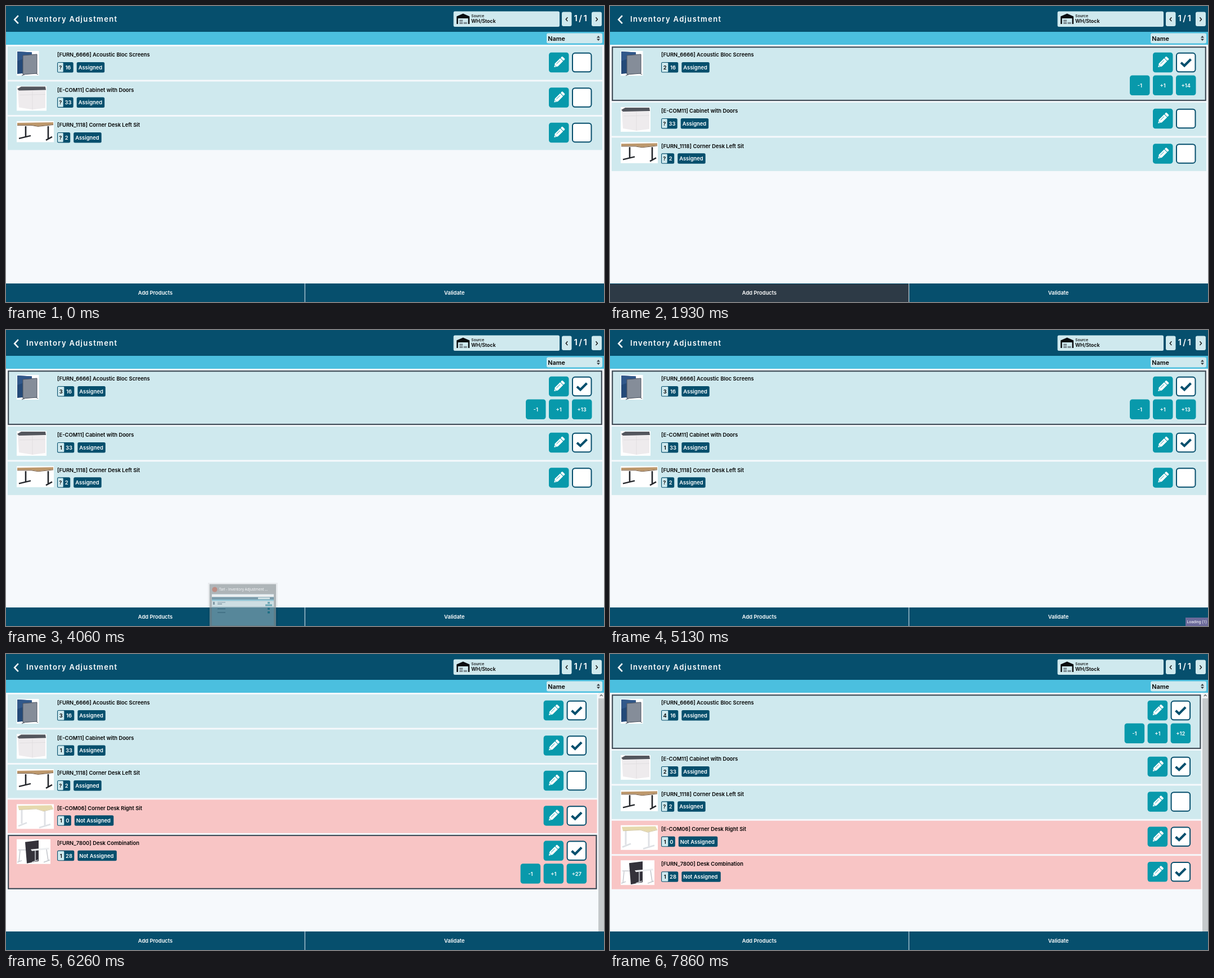
An HTML page for the animation above (8000 ms loop, 1063 px wide and 527 px high).

```html
<!DOCTYPE html>
<html lang="en">
<head>
<meta charset="utf-8">
<title>Inventory Adjustment</title>
<style>
html, body { margin: 0; width: 100%; height: 100%; overflow: hidden; background: #f6f9fc; }
svg { display: block; width: 1063px; height: 527px; font: 600 9.4px Inter, "Open Sans", sans-serif; }
.mid { text-anchor: middle; }
.light { fill: #fff; }
</style>
</head>
<body>
<svg id="stage" viewBox="0 0 1063 527" xmlns="http://www.w3.org/2000/svg">
  <rect width="1063" height="527" fill="#f6f9fc"/>
  <g id="rows"></g>
  <g id="scrollbar">
    <rect x="1053" y="69" width="10" height="425" fill="#f0f1f2"/>
    <rect x="1053" y="79" width="10" height="415" fill="#c5c9cb"/>
    <path d="M1055.8 75l2.4-2.4 2.4 2.4" fill="none" stroke="#505050" stroke-width="1.1"/>
  </g>

  <rect width="1063" height="46" fill="#064f6d"/>
  <rect y="46" width="1063" height="23" fill="#4bbfdf"/>
  <path d="M21.8 17.2l-6.6 7 6.6 7" fill="none" stroke="#fff" stroke-width="2.6"/>
  <text class="light" x="36" y="27.5" font-size="13" letter-spacing="1.35">Inventory Adjustment</text>
  <g fill="#cfe9ee">
    <rect x="795.5" y="9.5" width="188.5" height="27.5" rx="2.5"/>
    <rect x="988" y="10.5" width="17.5" height="25.5" rx="3"/>
    <rect x="1041" y="10.5" width="18" height="25.5" rx="3"/>
    <rect x="961" y="48.5" width="99" height="18" rx="3"/>
  </g>
  <path d="M801 32V18.5L812.5 13.5 824 18.5V32H821.5V22H803.5V32z" fill="#0b0d10"/>
  <path d="M806 24.5h6v3.2h-6zM806 28.8h6V32h-6zM813.5 28.8h6V32h-6z" fill="#7d8b92"/>
  <text x="827" y="20.3" font-size="6.8" font-weight="500">Source</text>
  <text x="827" y="30.2" font-size="8.9">WH/Stock</text>
  <path d="M998.3 20.3l-3 3.4 3 3.4M1048.5 20.3l3 3.4-3 3.4" fill="none" stroke="#111" stroke-width="1.4"/>
  <text class="light" x="1009.5" y="27" font-size="15" letter-spacing="2.5">1/1</text>
  <text x="963.3" y="61.5" font-size="10.8">Name</text>
  <path d="M1050 56.5l3-3.6 3 3.6zM1050 58.5l3 3.6 3-3.6z" fill="#343a40"/>

  <rect y="494" width="1063" height="33" fill="#064f6d"/>
  <rect id="hover" y="495" width="531" height="32" fill="#2d3a46"/>
  <rect x="530.8" y="494" width="1" height="33" fill="#e8f1f5"/>
  <text class="light mid" x="265.5" y="513.8">Add Products</text>
  <text class="light mid" x="797" y="513.8">Validate</text>

  <g id="preview">
    <rect x="359" y="450" width="124" height="77" fill="#000" opacity=".08"/>
    <rect x="361.8" y="452.5" width="118.2" height="74.5" fill="#8b9498"/>
    <circle cx="371" cy="462" r="4.6" fill="#a2594a"/>
    <text class="light" x="379" y="464" font-family="'Open Sans', sans-serif" font-size="6.3" font-weight="400">Tarl - Inventory Adjustment ...</text>
    <rect x="366" y="470" width="110" height="56" fill="#7fa3b0"/>
    <rect x="366" y="470.5" width="110" height="5" fill="#e6ebed"/>
    <rect x="366" y="475.5" width="110" height="4.5" fill="#3f7084"/>
    <rect x="448" y="476.3" width="21" height="2.8" fill="#c6dde2"/>
    <rect x="366" y="480" width="110" height="2" fill="#62b2c8"/>
    <rect x="366" y="482.5" width="110" height="10" fill="#b9d2d8"/>
    <path d="M368 484h3v5h-3zM376 484.5h14v1h-14zM376 487h8v1.6h-8zM376 496h14v1h-14zM376 502.500h14v1h-14z" fill="#48697a"/>
    <path d="M461 488.500h12v3h-12zM465 484h4v3.5h-4zM465 494.500h4v3.500h-4zM465 501h4v3.500h-4z" fill="#287f91"/>
  </g>
  <g id="loading">
    <rect x="1023" y="512" width="40" height="15" fill="#6b6a9a"/>
    <text class="light" x="1025.5" y="522" font-family="Roboto, sans-serif" font-size="7" font-weight="400">Loading (1)</text>
  </g>
</svg>
<script>
const LOOP = 8000;
const NAVY = '#064f6d', TEAL = '#0899ab', PALE = '#cfe9ee', PINK = '#f8c5c5';
const $ = id => document.getElementById(id);

const box = (x, y, w, h, fill, extra = '') =>
  `<rect x="${x}" y="${y}" width="${w}" height="${h}" fill="${fill}" ${extra}/>`;
const shape = (d, fill) => `<path d="${d}" fill="${fill}"/>`;
const stroke = (d, color, width) =>
  `<path d="${d}" fill="none" stroke="${color}" stroke-width="${width}"/>`;
const label = (x, y, text, attrs = '') => `<text x="${x}" y="${y}" ${attrs}>${text}</text>`;

// Thumbnails, drawn from their own top left corner.
const screens = box(0, 0, 39.5, 44, '#fff')
  + shape('M1 1L27 2.5V38L1 41z', '#244a78') + shape('M1 1L27 2.5V9L1 18z', '#31588a')
  + shape('M11 8L36 6V40L11 42z', '#858d99') + stroke('M11 8L36 6V40L11 42zM14 42l-5 2M34 40l4 2', '#4a5360', 1);
const cabinet = box(0, 0, 53, 44, '#fff')
  + shape('M2 7L51 8V39L28 42 4 38z', '#eeebed') + shape('M1 5L8 1H51L52 7 4 8z', '#53565d')
  + stroke('M5 16L51 15M28 9V42', '#dedbdd', .8);
const deskLeft = box(0, 0, 66, 37.5, '#fff')
  + stroke('M16 9V28M56 9V31', '#24272c', 2.6) + stroke('M4 31L25 26M52 34L63 28', '#24272c', 2.4)
  + shape('M1 3L65 2 65 6 38 9 26 7 1 7z', '#bd986c') + stroke('M1 7.500L26 7.500 38 9.500 65 6.500', '#71563d', 1);
const deskRight = box(0, 0, 66, 44, '#fff')
  + stroke('M9 10V35M50 12V38', '#dfe1e5', 3) + stroke('M3 39L18 33M40 42L60 36', '#dde0e4', 2.6)
  + shape('M2 3L62 2 65 8 48 12 35 8 4 10z', '#e6d9ad') + stroke('M4 10L35 8.500 48 12.500 65 8.500', '#c9bc91', .8);
const combination = box(0, 0, 60, 44, '#fff')
  + stroke('M3 19H23M6 20L4 40M19 20V38M1 41L9 38', '#c9ccd1', 1.6)
  + shape('M15 5L39 2V39L18 43z', '#34323a')
  + shape('M25 18L57 15 58 18 27 21z', '#eceef0')
  + stroke('M33 20V38M53 18L56 38M27 41L38 37M48 41L59 37', '#c5c8cd', 1.6);

const products = [
  { name: '[FURN_6666] Acoustic Bloc Screens', stock: 16, art: screens },
  { name: '[E-COM11] Cabinet with Doors', stock: 33, art: cabinet },
  { name: '[FURN_1118] Corner Desk Left Sit', stock: 2, art: deskLeft },
  { name: '[E-COM06] Corner Desk Right Sit', stock: 0, art: deskRight, extra: true },
  { name: '[FURN_7800] Desk Combination', stock: 28, art: combination, extra: true }
];

// Each scan: time, product index, counted quantity.
const scans = [
  [460, 0, 1], [1460, 0, 2], [2600, 1, 1], [3660, 0, 3], [5260, 3, 1],
  [5660, 4, 1], [6930, 1, 2], [7660, 0, 4]
];
const loadingSpans = [
  [60, 260], [400, 460], [930, 1200], [1460, 1530], [2600, 2660], [3600, 3660],
  [5130, 5260], [5600, 5660], [6860, 6930], [7600, 7660]
];

const pencil = (x, y) => `<g transform="translate(${x} ${y}) rotate(45)">`
  + box(-3.7, -12.2, 7.4, 4.2, '#fff', 'rx="1.5"') + shape('M-3.7 -7H3.7V6L0 12 -3.700 6z', '#fff')
  + stroke('M-1 -4V5M-1.600 8.500H1.600', TEAL, .9) + '</g>';

function quantityBadges(y, product, count) {
  const left = count ? 12.3 : 10.7;
  const right = product.stock > 9 ? 18 : 12.500;
  const end = 91 + left + right;
  const base = y + 41;
  return box(91, y + 28, left + right, 18.5, NAVY, 'rx="2.5"')
    + box(92.1, y + 29.1, left - 1.1, 16.3, PALE, 'rx="1.2"')
    + label(91.5 + left / 2, base, count || '?', 'class="mid"')
    + label(90.7 + left + right / 2, base, product.stock, 'class="mid light"')
    + box(end + 6, y + 28, product.extra ? 69.500 : 49.500, 18.5, NAVY, 'rx="2.5"')
    + label(end + 9, base, product.extra ? 'Not Assigned' : 'Assigned', 'class="light"');
}

function stepButtons(y, edge, rest) {
  const steps = rest > 0 ? ['-1', '+1', '+' + rest] : ['-1', '+1'];
  return steps.reverse().map((text, i) => {
    const x = edge - 54 - i * 41;
    return box(x, y + 51.5, 35.500, 35.500, TEAL, 'rx="4.5"')
      + label(x + 17.7, y + 72.9, text, 'class="mid light"');
  }).join('');
}

function productRow(y, product, count, selected, edge) {
  const fill = product.extra ? PINK : PALE;
  const checkX = edge - 54;
  return (selected
    ? box(4.2, y + 1.2, edge - 5.4, 94.800, fill, 'stroke="#424e59" stroke-width="2.2"')
    : box(3, y, edge - 3, 59.500, fill))
    + `<g transform="translate(19 ${y + 8})">${product.art}</g>`
    + label(91, y + 18.2, product.name)
    + quantityBadges(y, product, count)
    + box(checkX - 41, y + 10.8, 35.500, 35.500, TEAL, 'rx="4.5"')
    + pencil(checkX - 23.3, y + 28.6)
    + box(checkX + 1, y + 11.8, 33.5, 33.5, '#fff', `rx="4.5" stroke="${NAVY}" stroke-width="2"`)
    + (count ? stroke(`M${checkX + 9} ${y + 28.8}l6 5.500 11.500-11.500`, NAVY, 4.2) : '')
    + (selected ? stepButtons(y, edge, product.stock - count) : '');
}

function drawRows(done) {
  const counts = {};
  let selected = -1;
  for (const [, index, count] of scans.slice(0, done)) {
    counts[index] = count;
    selected = index;
  }
  const scrolls = counts[3] > 0;
  const edge = scrolls ? 1050.6 : 1060;
  let y = 72, markup = '';
  products.forEach((product, i) => {
    if (product.extra && !counts[i]) return;
    markup += productRow(y, product, counts[i], i === selected, edge);
    y += i === selected ? 99.9 : 62.45;
  });
  $('rows').innerHTML = markup;
  $('scrollbar').style.display = scrolls ? '' : 'none';
}

const ramp = (t, from, to) => Math.min(1, Math.max(0, (t - from) / (to - from)));
const pulse = (t, inFrom, inTo, outFrom, outTo) => ramp(t, inFrom, inTo) - ramp(t, outFrom, outTo);

let drawn = -1;
function draw(t) {
  const done = scans.filter(scan => scan[0] <= t).length;
  if (done !== drawn) drawRows(drawn = done);
  $('hover').setAttribute('opacity', pulse(t, 1730, 1900, 3150, 3330));
  $('preview').setAttribute('opacity', pulse(t, 3920, 4130, 4530, 4930));
  $('loading').style.display = loadingSpans.some(([a, b]) => t >= a && t < b) ? '' : 'none';
}

const start = performance.now();
function tick() {
  draw((performance.now() - start) % LOOP);
  requestAnimationFrame(tick);
}
tick();
</script>
</body>
</html>
```
